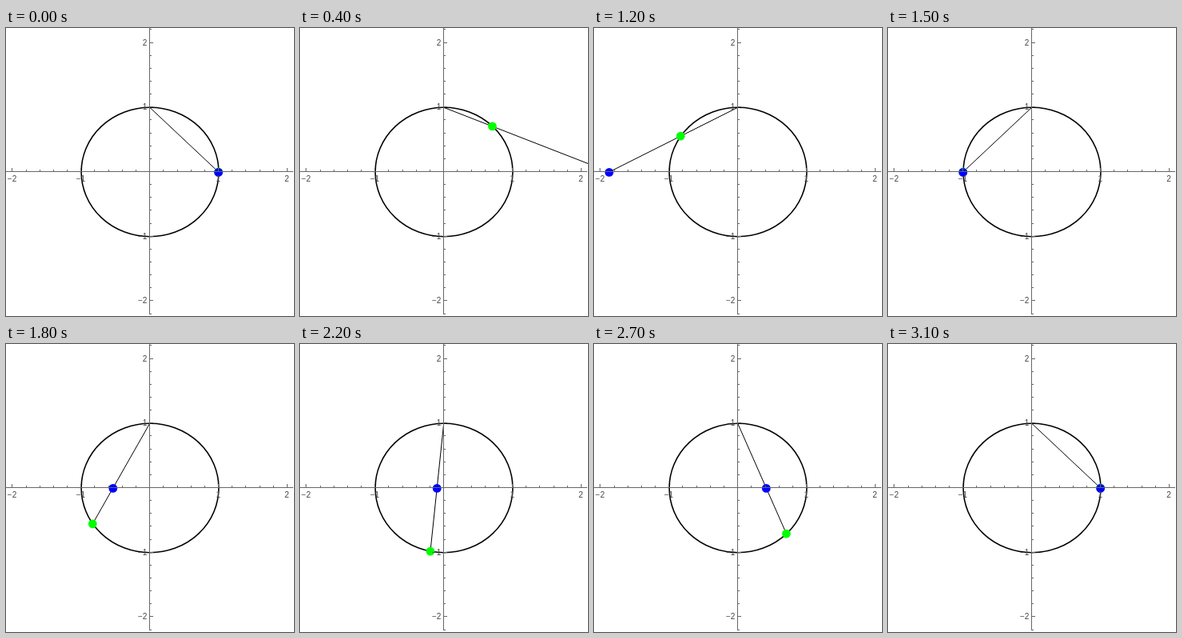
Write an HTML page that moves like this. It is 360x360 px and loops after 3.2 s.

```html
<!DOCTYPE html>
<html lang="en">
<head>
<meta charset="utf-8">
<title>Projection of a circle onto a line</title>
<style>
html, body { margin: 0; width: 100%; height: 100%; overflow: hidden; background: #fff; }
svg { display: block; width: 100%; height: 100%; }
text { font: 10px "Liberation Sans", Arial, sans-serif; fill: #444; }
</style>
</head>
<body>
<svg viewBox="0 0 360 360">
  <ellipse id="ring" fill="none" stroke="#000" stroke-width="1.6"/>
  <line id="ray" stroke="#000"/>
  <circle id="point" r="5.4" fill="#0f0"/>
  <circle id="image" r="5.4" fill="#00f"/>
  <path id="axes" fill="none" stroke="#666"/>
  <g id="labels"></g>
</svg>
<script>
const STEP = 100, STEPS = 32;
const CX = 179.7, CY = 180, UX = 85.9, UY = 80.7;
const AX = 179.5, AY = 179.5;
const $ = id => document.getElementById(id);
const px = x => CX + UX * x;
const py = y => CY + UY * -y;
const snap = v => Math.floor(v) + 0.5;

function set(el, attrs) {
  for (const key in attrs) el.setAttribute(key, attrs[key]);
}

function label(n, x, y, anchor) {
  const el = document.createElementNS("http://www.w3.org/2000/svg", "text");
  set(el, { x, y, "text-anchor": anchor });
  el.textContent = String(n).replace("-", "\u2212");
  $("labels").append(el);
}

function drawAxes() {
  let d = `M0 ${AY}H359M${AX} 0V358`;
  for (let i = -11; i <= 11; i++) {
    if (!i) continue;
    const v = i / 5, len = i % 5 ? 2.5 : 4.5;
    if (Math.abs(i) <= 10) d += `M${snap(px(v))} ${AY}v${-len}`;
    d += `M${AX} ${snap(py(v) - 0.5)}h${len}`;
  }
  set($("axes"), { d });
  for (const n of [-2, -1, 1, 2]) {
    label(n, px(n) - 0.4, 192, "middle");
    label(n, 176.3, py(n) + 3, "end");
  }
}

function render(ms) {
  let k = Math.floor(ms / STEP) % STEPS;
  if (k >= 8) k++; // the pole itself has no image, so it is skipped
  const a = k * 2 * Math.PI / STEPS;
  const x = Math.cos(a), y = Math.sin(a);
  const u = x / (1 - y);
  const end = y > 0 ? [u, 0] : [x, y];
  set($("point"), { cx: px(x), cy: py(y) });
  set($("image"), { cx: px(u), cy: py(0) + 0.4 });
  set($("ray"), { x1: px(0), y1: py(1), x2: px(end[0]), y2: py(end[1]) });
}

set($("ring"), { cx: CX + 0.3, cy: CY, rx: UX, ry: UY });
drawAxes();
const start = performance.now();
function tick() {
  render(performance.now() - start);
  requestAnimationFrame(tick);
}
tick();
</script>
</body>
</html>
```
